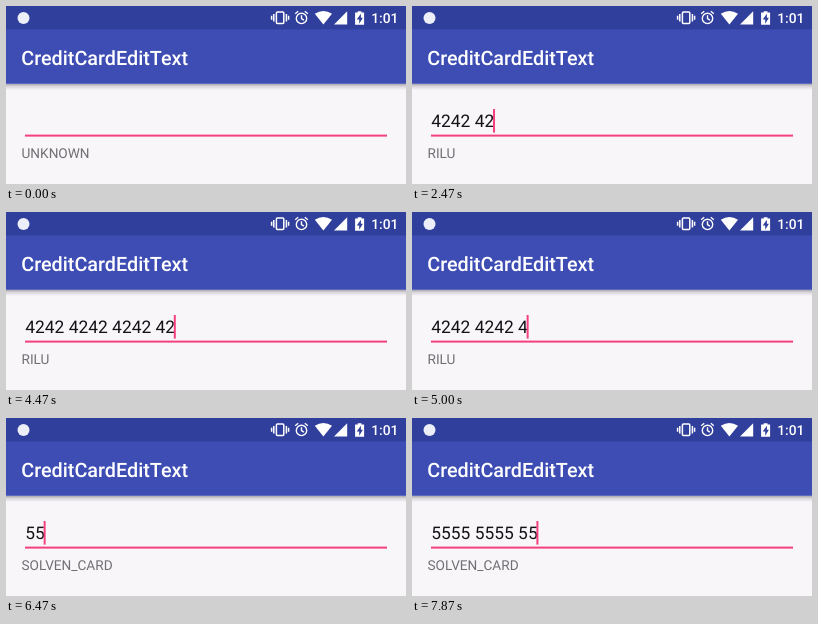
Recreate the animation shown at these times as an HTML page. Size 400 px wide and 178 px high, loop 8 s.

```html
<!DOCTYPE html>
<html lang="en">
<head>
<meta charset="utf-8">
<title>CreditCardEditText</title>
<style>
  html, body { margin: 0; width: 100%; height: 100%; overflow: hidden; background: #f8f6f9; }
  svg { display: block; width: 100vw; height: 100vh; }
  text { font-family: Roboto, sans-serif; white-space: pre; text-rendering: geometricPrecision; }
  .bold { font-weight: 500; fill: #fff; }
</style>
</head>
<body>
<svg viewBox="0 0 400 178" xmlns="http://www.w3.org/2000/svg">
  <defs>
    <linearGradient id="shadow" x2="0" y2="1">
      <stop offset="0" stop-color="#55535c" stop-opacity=".5"/>
      <stop offset=".4" stop-color="#55535c" stop-opacity=".2"/>
      <stop offset="1" stop-color="#55535c" stop-opacity="0"/>
    </linearGradient>
  </defs>
  <rect width="400" height="178" fill="#f8f6f9"/>
  <rect y="77.8" width="400" height="6.2" fill="url(#shadow)"/>
  <rect width="400" height="77.8" fill="#3e4db4"/>
  <rect width="400" height="23.4" fill="#303f9c"/>

  <g fill="#fff">
    <circle cx="17.5" cy="12" r="6" fill="#eceef8"/>
    <!-- vibrate -->
    <g fill="none" stroke="#fff" stroke-width="1.5">
      <rect x="270.4" y="6" width="7.4" height="11.6" rx="1"/>
      <path d="M267.8 8v7.6M265.6 9.8v4M280.4 8v7.6M282.6 9.8v4"/>
    </g>
    <!-- alarm -->
    <g fill="none" stroke="#fff" stroke-width="1.4">
      <circle cx="295.5" cy="12.4" r="5.2"/>
      <path d="M295.5 9.3v3.4l2.4 1.5M289.2 7.8l3-2.5M301.8 7.8l-3-2.5"/>
    </g>
    <!-- wifi, signal, battery -->
    <path d="M317.4 18.4L308.8 7.7Q317.4 2.1 326 7.7Z"/>
    <path d="M328 18.4L341.2 5.2V18.4Z"/>
    <path d="M349.1 6.6h2.6V5.2h3.8v1.4h2.6v12.2h-9Z"/>
    <path d="M354.9 7.8v3.9h2l-3.7 6v-4.2h-2.5Z" fill="#303f9c"/>
  </g>
  <text class="bold" x="365.2" y="17" font-size="13.8">1:01</text>
  <text class="bold" x="15.3" y="58.6" font-size="19.8">CreditCardEditText</text>

  <rect x="19" y="128.6" width="362" height="2" fill="#f5407f"/>
  <text id="number" x="19.3" y="121.4" font-size="17.4" fill="#131216"></text>
  <rect id="cursor" y="103" width="2" height="23.6" fill="#f5407f"/>
  <text id="brand" x="15.5" y="151.9" font-size="13.65" fill="#716f74"></text>
</svg>
<script>
const LOOP = 8000, START_X = 19.3, SIZE = 17.4;
const number = document.getElementById('number');
const cursor = document.getElementById('cursor');
const brand = document.getElementById('brand');

// Each time types one digit
const visaKeys = [1270, 1530, 2070, 2200, 2330, 2470, 2530, 2670, 2800, 2930,
  3130, 3270, 3330, 3470, 3600, 3730];
// Each time deletes one digit; a held key then repeats
const deletes = [4330, 4470, 4670];
for (let i = 0; i < 13; i++) deletes.push(Math.round(480 + i * 20 / 3) * 10);
const masterKeys = [6200, 6470, 7000, 7130, 7270, 7400, 7530, 7600, 7730, 7870];
// Blink intervals with the cursor hidden
const hidden = [[0, 530], [1000, 1270], [4200, 4330], [6130, 6200], [6930, 7000]];

const passed = (times, t) => times.filter(at => at <= t).length;
const group = digits => digits.replace(/(.{4})(?=.)/g, '$1 ');

function stateAt(t) {
  const second = passed(masterKeys, t);
  if (second) return { digits: '5'.repeat(second), label: second > 1 ? 'SOLVEN_CARD' : 'UNKNOWN' };
  const first = passed(visaKeys, t) - passed(deletes, t);
  return { digits: '42'.repeat(8).slice(0, first), label: first ? 'RILU' : 'UNKNOWN' };
}

function draw(t) {
  const { digits, label } = stateAt(t);
  const text = group(digits);
  const spaces = text.length - digits.length;
  const width = (digits.length * 0.5615 + spaces * 0.2475) * SIZE;
  number.textContent = text;
  brand.textContent = label;
  cursor.setAttribute('x', START_X + width - 1.2);
  cursor.style.display = hidden.some(([from, to]) => t >= from && t < to) ? 'none' : '';
}

const begin = performance.now();
function tick() {
  draw((performance.now() - begin) % LOOP);
  requestAnimationFrame(tick);
}
tick();
</script>
</body>
</html>
```
